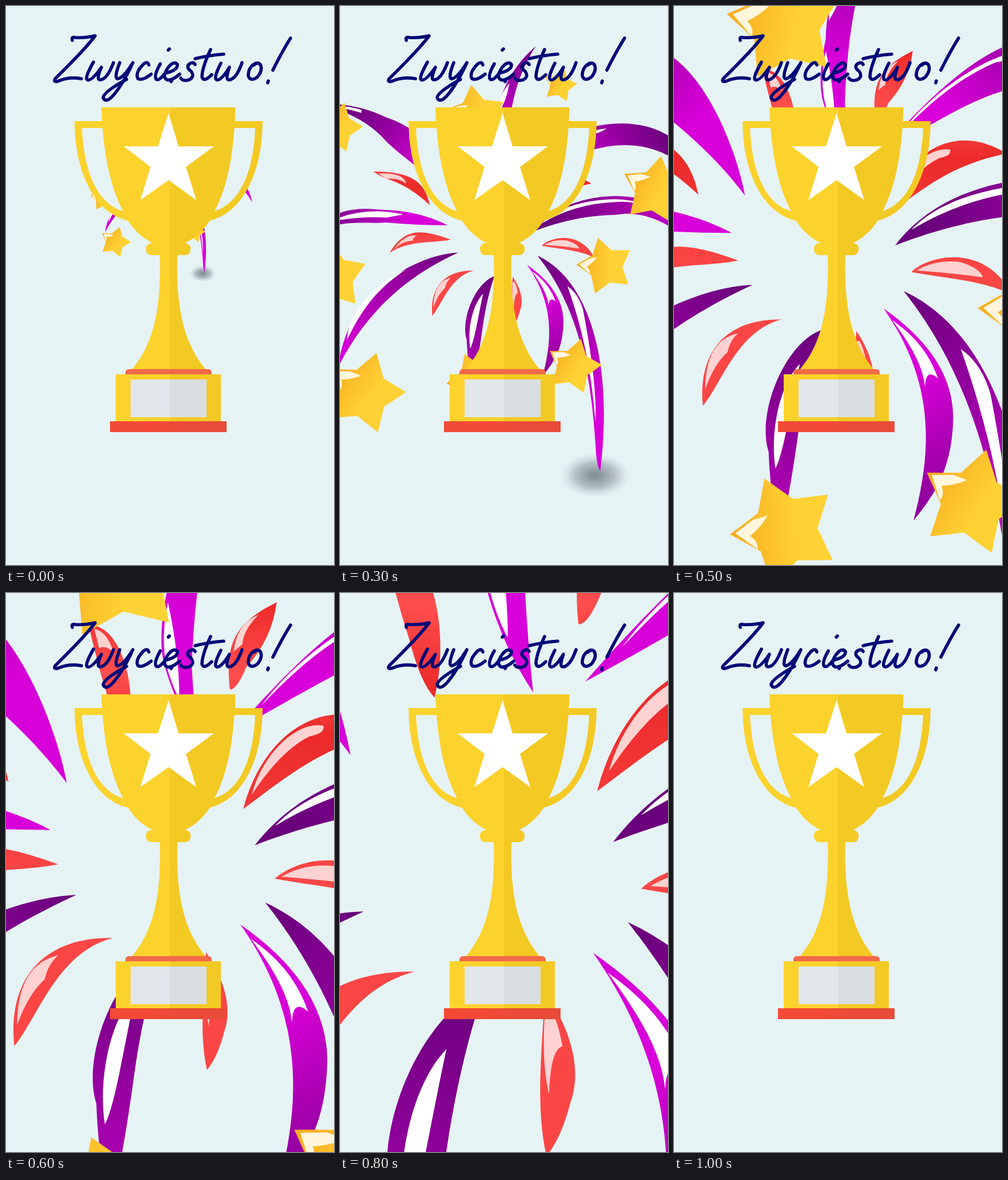
An HTML page for the animation above (1.1 s loop, 574 px wide and 976 px high).

```html
<!DOCTYPE html>
<html lang="pl">
<head>
<meta charset="utf-8">
<title>Zwycięstwo!</title>
<style>
  html, body { margin: 0; width: 100%; height: 100%; overflow: hidden; background: #e6f3f5; }
  svg { display: block; width: 100%; height: 100%; }
</style>
</head>
<body>
<svg viewBox="0 0 574 976">
  <defs>
    <radialGradient id="outward" gradientUnits="userSpaceOnUse" cx="280" cy="400" r="600">
      <stop offset=".22" stop-color="#6a007c"/><stop offset=".5" stop-color="#9b00a4"/><stop offset=".85" stop-color="#d800d8"/>
    </radialGradient>
    <radialGradient id="inward" gradientUnits="userSpaceOnUse" cx="280" cy="400" r="500">
      <stop offset=".45" stop-color="#d800d8"/><stop offset=".7" stop-color="#9c00a6"/><stop offset=".95" stop-color="#6a007c"/>
    </radialGradient>
    <linearGradient id="red" gradientUnits="userSpaceOnUse" x1="0" y1="160" x2="0" y2="450">
      <stop offset="0" stop-color="#ec2626"/><stop offset=".28" stop-color="#ff4f4f"/><stop offset=".5" stop-color="#ec2a2a"/><stop offset="1" stop-color="#fb4646"/>
    </linearGradient>
    <linearGradient id="gold" gradientUnits="userSpaceOnUse" x1=".9" y1="0" x2="-.2" y2="0">
      <stop offset="0" stop-color="#f9ad22"/><stop offset="1" stop-color="#fed234"/>
    </linearGradient>
    <radialGradient id="shade">
      <stop offset=".1" stop-color="#84929a"/><stop offset=".55" stop-color="#a5b1b6" stop-opacity=".8"/><stop offset="1" stop-color="#c8d4d8" stop-opacity="0"/>
    </radialGradient>
    <linearGradient id="cup" gradientUnits="userSpaceOnUse" x1="0" y1="0" x2="574" y2="0">
      <stop offset=".5" stop-color="#fcd22d"/><stop offset=".5" stop-color="#f3c924"/>
    </linearGradient>
    <linearGradient id="plate" gradientUnits="userSpaceOnUse" x1="0" y1="0" x2="574" y2="0">
      <stop offset=".5" stop-color="#e3e6ea"/><stop offset=".5" stop-color="#dadde0"/>
    </linearGradient>
    <linearGradient id="foot" gradientUnits="userSpaceOnUse" x1="182" y1="0" x2="386" y2="0">
      <stop offset=".35" stop-color="#f24a37"/><stop offset=".65" stop-color="#e84b38"/>
    </linearGradient>
  </defs>

  <g id="burst">
    <ellipse cx="522" cy="1028" rx="88" ry="56" fill="url(#shade)"/>
    <g fill="url(#outward)">
      <path d="M378 480C500 535 570 730 535 1017Q528 1010 524 970C514 780 482 610 378 480Z"/>
      <path d="M270 531C222 548 185 640 201 690Q204 760 216 800Q229 745 240 665Q250 590 270 531Z"/>
      <path d="M180 472C100 474-95 550-120 757C-60 640 30 540 180 472Z"/>
      <path d="M367 420C425 345 520 332 574 331C720 335 820 420 848 561C775 440 680 360 574 378C490 380 425 398 367 420Z"/>
    </g>
    <g fill="url(#inward)">
      <path d="M352 503C420 550 443 600 443 645C442 710 420 745 391 780C415 690 420 600 352 503Z"/>
      <path d="M153 404C100 376 40 367 0 366S-130 345-191 433C-130 385-50 402 0 397Q77 404 153 404Z"/>
      <path d="M170 355C162 310 130 215 77 175Q40 148 0 135Q-80 96-174 102Q-60 125 0 195C40 235 110 275 170 355Z"/>
      <path d="M374-43C300 20 276 100 276 150Q264 205 273 234Q285 275 307 308Q303 270 301 233C305 130 320 40 374-43Z"/>
      <path d="M346 300C380 262 445 188 510 160C640 128 770 170 804 333C740 220 650 200 574 205C480 215 440 250 346 300Z"/>
    </g>
    <g fill="#fff">
      <path d="M453 556Q480 574 492 615C510 710 527 820 523 895C513 765 490 660 453 556Z"/>
      <path d="M242 575C213 605 203 670 210 712C221 690 228 640 242 575Z"/>
      <path d="M50 514C-25 545-95 620-98 690C-60 610-20 560 50 514Z"/>
      <path d="M388 400C430 355 510 340 574 339Q640 342 680 365Q620 342 574 346Q470 350 388 400Z"/>
      <path d="M363 518C395 560 404 585 406 605Q407 580 423 594C413 565 395 540 363 518Z"/>
      <path d="M43 377Q-60 355-140 395Q-60 380 0 385Z"/>
      <path d="M-62 116Q-100 104-140 108Q-100 112-62 124Z"/>
      <path d="M308 50C285 75 280 100 280 126Q300 95 308 50Z"/>
      <path d="M276 166Q268 205 275 234Q281 255 288 267Q288 220 276 166Z"/>
      <path d="M374 274C404 232 480 167 550 163Q535 175 498 181Q435 208 374 274Z"/>
    </g>
    <g fill="url(#red)">
      <path d="M109 354C96 290 55 270-33 270Q-10 285 10 291Q60 308 109 354Z"/>
      <path d="M8 473C45 412 85 412 161 440C110 450 60 440 8 473Z"/>
      <path d="M115 630C108 560 145 516 218 517C160 532 140 600 115 630Z"/>
      <path d="M316 532C335 560 344 590 335 615Q328 642 317 655C309 620 313 580 316 532Z"/>
      <path d="M388 455C415 430 488 420 520 485C485 466 430 463 388 455Z"/>
      <path d="M355 382C375 305 440 255 513 300C440 315 405 345 355 382Z"/>
      <path d="M390 166C345 188 336 210 341 257Q348 258 358 234Q385 205 390 166Z"/>
      <path d="M193 190C226 188 247 255 233 312Q222 300 214 268Q204 238 193 190Z"/>
    </g>
    <g fill="#ffd2d2">
      <path d="M-20 275Q45 272 50 301Q35 286 0 288Z"/>
      <path d="M20 463Q48 425 76 430Q65 436 66 443Q45 441 20 463Z"/>
      <path d="M118 608Q118 545 161 535Q150 545 147 560Q130 575 118 608Z"/>
      <path d="M316 546Q313 585 319 609Q320 575 329 573Q326 555 320 545Z"/>
      <path d="M395 453Q420 438 452 442Q478 450 482 462Q440 456 395 453Z"/>
      <path d="M364 367C375 325 410 290 439 295Q441 303 425 306Q395 320 364 367Z"/>
      <path d="M345 217Q348 188 371 179Q355 195 354 210Z"/>
      <path d="M199 194Q212 196 219 218Q210 210 204 214Z"/>
    </g>
    <g id="stars"></g>
  </g>

  <!-- trophy -->
  <g fill="url(#cup)">
    <path d="M120 201H449C449 290 414 362 355 375H214C155 362 120 290 120 201Z"/>
    <path fill="#e6f3f5" d="M133 213H436C433 290 409 345 365 358H204C160 345 136 290 133 213Z"/>
    <path d="M167 177H401.500C399 270 383 325 365 358C355 383 334 406 308 416H262C236 406 215 383 205 358C187 325 170 270 167 177Z"/>
    <rect x="245" y="414" width="78" height="21" rx="9"/>
    <path d="M269 434H300C297 530 312 590 350 635H220C258 590 272 530 269 434Z"/>
    <rect x="209" y="634" width="151" height="14" rx="6" fill="#f26948"/>
    <rect x="192" y="643" width="184" height="82"/>
    <rect x="218" y="652" width="133" height="66" fill="url(#plate)"/>
    <rect x="182" y="725" width="204" height="19" fill="url(#foot)"/>
    <path fill="#fff" d="M284.500 187L302 245H364L315 281L333 339L284.500 304L235 339L253 281L206 245H266Z"/>
  </g>

  <!-- brush lettering -->
  <g role="img" aria-label="Zwycięstwo!" fill="none" stroke="#000a78" stroke-width="5.600" stroke-linecap="round" stroke-linejoin="round">
    <path d="M116 60Q114 53 121 55Q140 56 156 52Q140 74 86 127Q82 134 92 131Q110 123 132 127"/>
    <path d="M153 98Q136 128 143 129Q150 131 167 107Q157 129 165 129Q177 128 188 99"/>
    <path d="M199 99Q188 127 196 127Q206 125 222 99Q204 138 186 158Q174 170 170 160Q171 150 211 128"/>
    <path d="M250 103Q248 96 241 101Q225 117 231 127Q239 131 254 119"/>
    <path d="M270 101Q258 122 263 128Q268 131 278 118M284 77L286 75"/>
    <path d="M280 117Q301 112 300 102Q294 95 284 107Q272 124 282 129Q290 131 304 119M290 130L289 132"/>
    <path d="M331 102Q328 97 321 101Q314 107 324 114Q331 124 320 129Q310 132 306 126"/>
    <path d="M358 76Q343 108 343 124Q346 134 360 120M331 92Q355 86 381 84"/>
    <path d="M376 100Q362 127 369 129Q377 130 391 107Q383 129 390 129Q403 128 413 99"/>
    <path d="M437 100Q424 106 424 122Q428 133 440 124Q450 112 445 102Q440 97 434 103"/>
    <path d="M498 56Q484 78 467 112M458 134L459 131"/>
  </g>
</svg>
<script>
  // Star: centre x, centre y, radius, direction of the glossy tip
  const stars = [
    [468, 756, 71, 213], [223, 793, 73, 176], [548, 506, 73, 183],
    [672, 317, 87, 208], [434, 55, 43, 211], [223, 131, 78, 190],
    [-122, 160, 64, 214], [-133, 533, 87, 194], [-55, 822, 104, 215]
  ];
  const corners = Array.from({ length: 10 }, (_, i) => {
    const r = i % 2 ? .58 : 1, a = i * Math.PI / 5;
    return `${r * Math.cos(a)},${r * Math.sin(a)}`;
  }).join(' ');
  document.getElementById('stars').innerHTML = stars.map(([x, y, r, tip]) =>
    `<g transform="translate(${x} ${y}) rotate(${tip}) scale(${r})">
      <polygon points="${corners}" fill="url(#gold)"/>
      <path d="M.9 .01L.57 .23L.3 .29Q.42 .1 .64 -.06Q.5 -.15 .52 -.3Z" fill="#fff6dc"/>
    </g>`).join('');

  // Burst per step: scale, centre x, centre y
  const STEP = 100, LOOP = 1100;
  const poses = [
    [.266, 280, 300], [.36, 278, 328], [.46, 274, 356], [.7, 277, 380], [1, 280, 400],
    [1.335, 271, 391], [1.67, 290, 407], [2, 283, 398], [2.333, 275, 388], [2.667, 278, 390]
  ];
  const burst = document.getElementById('burst');
  const start = performance.now();

  function draw() {
    const time = Math.max(0, performance.now() - start) % LOOP;
    const pose = poses[Math.floor(time / STEP)];
    burst.style.display = pose ? '' : 'none';
    if (pose) {
      const [scale, x, y] = pose;
      burst.setAttribute('transform', `translate(${x} ${y}) scale(${scale}) translate(-280 -400)`);
    }
    requestAnimationFrame(draw);
  }
  draw();
</script>
</body>
</html>
```
